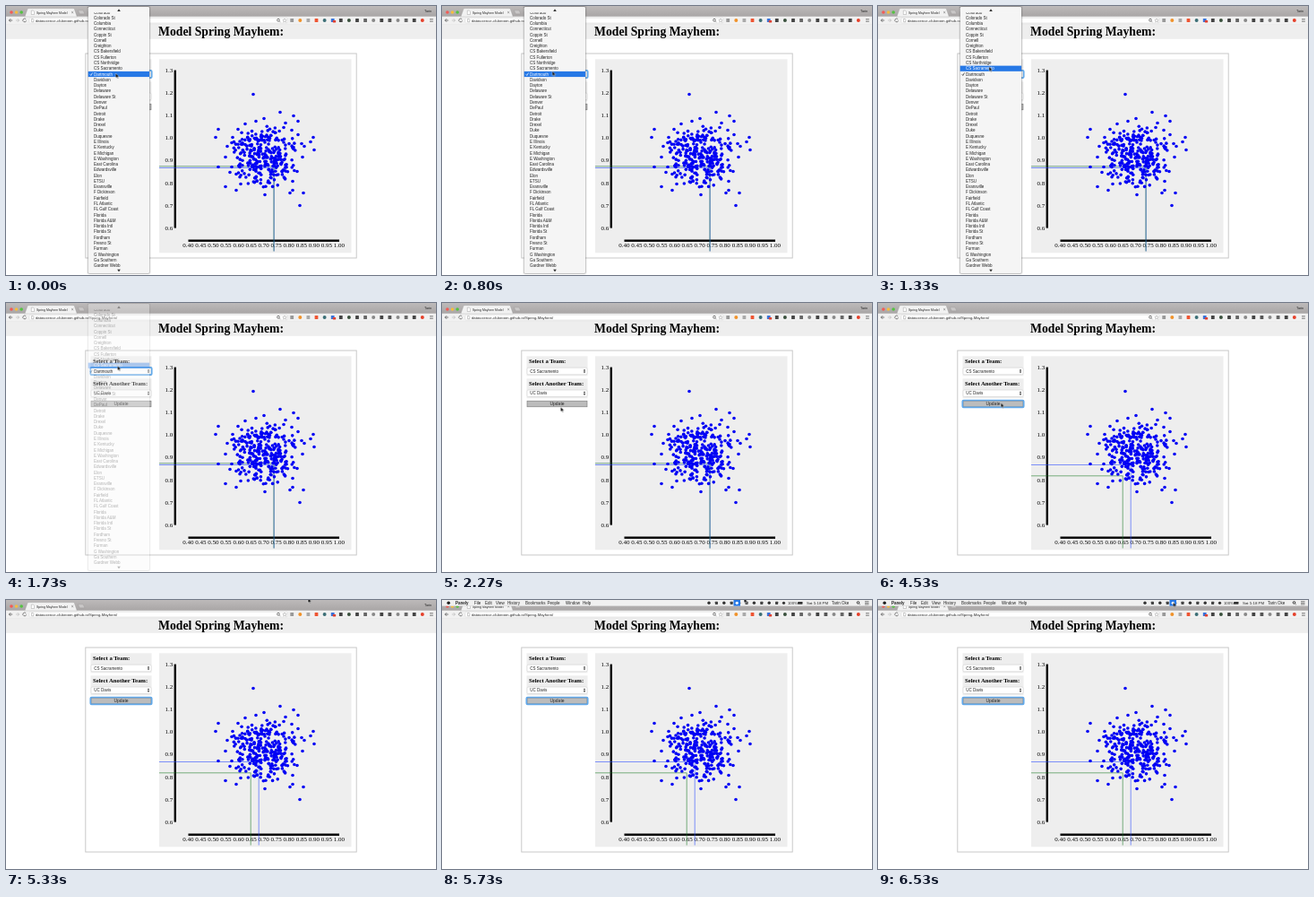
An HTML page that plays this animation: 480x300 px, repeating every 6.59 s.

```html
<!DOCTYPE html>
<html lang="en">
<head>
<meta charset="utf-8">
<title>Spring Mayhem Model</title>
<style>
  html, body { margin: 0; width: 100%; height: 100%; overflow: hidden; background: #fff; }
  svg { display: block; width: 100%; height: 100%; }
  text { font-family: "Liberation Sans", Arial, sans-serif; font-size: 4.5px; fill: #222; white-space: pre; }
  .serif { font-family: "Liberation Serif", Times, serif; fill: #000; }
  .bold { font-weight: bold; }
</style>
</head>
<body>
<svg id="stage" viewBox="0 0 480 300"></svg>
<script>
const LOOP = 6590;
const stage = document.getElementById('stage');

function add(parent, tag, attrs = {}, content) {
  const el = document.createElementNS('http://www.w3.org/2000/svg', tag);
  for (const key in attrs) el.setAttribute(key, attrs[key]);
  if (content !== undefined) el.textContent = content;
  parent.append(el);
  return el;
}
const group = (parent = stage) => add(parent, 'g');
const rect = (p, x, y, width, height, fill, more) => add(p, 'rect', { x, y, width, height, fill, ...more });
const circle = (p, cx, cy, r, fill) => add(p, 'circle', { cx, cy, r, fill });
const path = (p, d, fill, more) => add(p, 'path', { d, fill, ...more });
const text = (p, x, y, str, size = 4.5, more) => add(p, 'text', { x, y, style: `font-size:${size}px`, ...more }, str);
const line = (p, d, stroke, width = 0.7) => path(p, d, 'none', { stroke, 'stroke-width': width });

// steps: [ms, value]; equal neighbouring times make a hard change
function play(el, prop, steps) {
  const frames = steps.map(([ms, value]) => ({ offset: ms / LOOP, [prop]: value }));
  frames.unshift({ offset: 0, [prop]: steps[0][1] });
  frames.push({ offset: 1, [prop]: steps.at(-1)[1] });
  el.animate(frames, { duration: LOOP, iterations: Infinity });
}
const showUntil = (el, ms) => play(el, 'opacity', [[ms, 1], [ms, 0]]);
const showFrom = (el, ms) => play(el, 'opacity', [[ms, 0], [ms, 1]]);

function drawBrowser() {
  const g = group();
  const shade = add(g, 'linearGradient', { id: 'strip', x2: 0, y2: 1 });
  add(shade, 'stop', { offset: 0, 'stop-color': '#bdbaba' });
  add(shade, 'stop', { offset: 1, 'stop-color': '#a8a5a5' });
  rect(g, 0, 0, 480, 12, 'url(#strip)');
  rect(g, 0, 11.7, 480, 8.6, '#f1f1f1');
  path(g, 'M21 12 L24 3.5 Q24.3 2.7 25.2 2.7 H75 Q76 2.7 76.3 3.5 L79.3 12Z', '#f2f2f2', { stroke: '#999', 'stroke-width': 0.3 });
  ['#f25b56', '#f5bd3e', '#54c242'].forEach((c, i) => circle(g, 6 + i * 5.6, 7, 1.8, c));
  path(g, 'M28.3 5.1h2.2l1 1v3.4h-3.2z', '#fff', { stroke: '#888', 'stroke-width': 0.4 });
  text(g, 34, 8.5, 'Spring Mayhem Model', 3.45);
  line(g, 'M73.1 6l2.2 2.2m0-2.2l-2.2 2.2', '#666', 0.5);
  path(g, 'M80.5 4.8h5.6l1.7 4h-5.6z', '#c9c7c7', { stroke: '#8e8b8b', 'stroke-width': 0.3 });
  text(g, 467, 6.5, 'Tarin', 3.8);

  line(g, 'M7.2 16H3.5m1.7-1.8L3.4 16l1.8 1.8', '#444');
  line(g, 'M11 16h3.7m-1.8-1.8l1.8 1.8-1.8 1.8', '#bbb');
  line(g, 'M22.3 14.8a1.9 1.9 0 1 0 .3 1.6', '#555');
  rect(g, 26, 13.2, 288, 5.8, '#fff', { rx: 0.9, stroke: '#c8c8c8', 'stroke-width': 0.35 });
  path(g, 'M28.6 14.4h1.6l.7.7v2.7h-2.3z', '#fff', { stroke: '#777', 'stroke-width': 0.4 });
  text(g, 33, 17.5, 'datascience-clubroom.github.io/Spring-Mayhem/', 4.25);
  circle(g, 304, 15.7, 1.4, 'none').setAttribute('stroke', '#777');
  line(g, 'M305 16.8l1.4 1.4', '#777');
  path(g, 'M311 13.9l.7 1.5 1.6.1-1.2 1 .4 1.6-1.5-.9-1.4.9.4-1.6-1.2-1 1.6-.1z', '#fff', { stroke: '#888', 'stroke-width': 0.4 });

  const icons = ['#999', '#f0922b', '#aaa', '#ee5533', '#3c6f76', '#3a72d8', '#444', '#39503c', '#444',
    '#666', '#888', '#444', '#555', '#888', '#666', '#444', '#e5402a'];
  icons.forEach((c, i) => {
    const x = 319.2 + i * 9.1;
    i % 3 === 1 ? circle(g, x, 16, 2, c) : rect(g, x - 1.9, 14.1, 3.8, 3.8, c, { rx: 0.5 });
  });
  rect(g, 364.8, 15.9, 3.4, 2.5, '#df4030', { rx: 0.4 });
  for (const y of [14.5, 16, 17.5]) rect(g, 473, y - 0.3, 3.8, 0.6, '#666');
  rect(g, 0, 20, 480, 0.4, '#c8c8c8');
}

function drawSelect(g, y) {
  rect(g, 95, y, 67, 7.6, '#fff', { rx: 1.2, stroke: '#c6c6c6', 'stroke-width': 0.5 });
  path(g, `M157.8 ${y + 3.3}l1.2-1.8 1.2 1.8zM157.8 ${y + 4.3}l1.2 1.8 1.2-1.8z`, '#222');
}

const ring = (g, y, height) => rect(g, 94.3, y, 68.4, height, 'none', { rx: 1.2, stroke: '#62a9ea', 'stroke-width': 1.7 });

function drawPage() {
  const g = group();
  rect(g, 0, 20.4, 480, 16.4, '#eee');
  text(g, 240, 33.2, 'Model Spring Mayhem:', 13.7, { class: 'serif bold', 'text-anchor': 'middle' });
  rect(g, 88.8, 53, 302.4, 228, '#fff', { stroke: '#c8c8c8', 'stroke-width': 1 });
  rect(g, 94.5, 59.3, 68, 22, '#eee');
  rect(g, 94.5, 84.3, 68, 22, '#eee');
  text(g, 97, 67.2, 'Select a Team:', 6.7, { class: 'serif bold' });
  text(g, 97, 92.2, 'Select Another Team:', 6.7, { class: 'serif bold' });
  drawSelect(g, 72.2);
  drawSelect(g, 97);
  text(g, 98.3, 102.4, 'UC Davis');
  showUntil(text(g, 98.3, 77.6, 'Dartmouth'), 1800);
  showFrom(text(g, 98.3, 77.6, 'CS Sacramento'), 1800);
  showUntil(ring(g, 71.9, 8.2), 1800);

  rect(g, 95, 109.2, 67, 6.6, '#bcbcbc', { stroke: '#777', 'stroke-width': 0.6 });
  text(g, 128.5, 114.2, 'Update', 5, { 'text-anchor': 'middle' });
  showFrom(ring(g, 108.5, 7.9), 3530);
}

function drawPlot() {
  const g = group();
  rect(g, 171, 59.3, 214.5, 216, '#eee');
  rect(g, 187.6, 71.6, 2.4, 176, '#000');
  rect(g, 203.5, 260.5, 168.5, 2.4, '#000');
  for (let i = 0; i < 8; i++)
    text(g, 186.3, 74 + i * 25.1, (1.3 - i / 10).toFixed(1), 7, { class: 'serif', 'text-anchor': 'end' });
  for (let i = 0; i < 13; i++)
    text(g, 203.3 + i * 14.05, 269.4, (0.4 + i / 20).toFixed(2), 7, { class: 'serif', 'text-anchor': 'middle' });

  const marker = (p, x, y, color) => line(p, `M171 ${y}H${x}V273.5`, color, 0.6);
  const before = group(g), after = group(g);
  marker(before, 299.2, 180.5, '#3050ff');
  marker(before, 299, 178.8, '#16703a');
  marker(after, 282.2, 180.5, '#3050ff');
  marker(after, 273.2, 192.8, '#23802d');
  showUntil(before, 3530);
  showFrom(after, 3530);

  const edge = [[276, 99], [306, 119], [321, 123], [326, 129], [237, 138], [234, 147], [288, 126], [343, 147],
    [340, 152], [333, 157], [344, 161], [237, 180], [245, 202], [257, 206], [328, 223], [332, 209], [317, 209],
    [320, 206], [289, 211], [267, 132], [279, 129], [259, 138], [253, 147], [312, 131], [310, 136], [319, 139],
    [326, 144], [325, 185], [320, 196], [245, 169], [250, 186], [252, 180], [247, 157], [252, 153], [262, 199],
    [330, 154], [331, 169]];
  const dot = (x, y) => circle(g, x, y - 0.5, 1.8, '#0000f4');
  edge.forEach(([x, y]) => dot(x, y));

  let seed = 20;
  const random = () => (seed = seed * 16807 % 2147483647) / 2147483647;
  for (let n = 0; n < 280;) {
    const r = Math.sqrt(-2 * Math.log(random()));
    const a = random() * Math.PI * 2;
    if (r > 1.9) continue;
    dot(288.5 + 20.5 * r * Math.cos(a), 168 + 19 * r * Math.sin(a));
    n++;
  }
}

function drawPopup() {
  const teams = ('Colorado,Colorado St,Columbia,Connecticut,Coppin St,Cornell,Creighton,CS Bakersfield,CS Fullerton,' +
    'CS Northridge,CS Sacramento,Dartmouth,Davidson,Dayton,Delaware,Delaware St,Denver,DePaul,Detroit,Drake,Drexel,' +
    'Duke,Duquesne,E Illinois,E Kentucky,E Michigan,E Washington,East Carolina,Edwardsville,Elon,ETSU,Evansville,' +
    'F Dickinson,Fairfield,FL Atlantic,FL Gulf Coast,Florida,Florida A&M,Florida Intl,Florida St,Fordham,Fresno St,' +
    'Furman,G Washington,Ga Southern,Gardner Webb').split(',');
  const rowY = i => 76 + (i - 11) * 6.28;
  const g = group();
  for (const [grow, alpha] of [[1.6, 0.05], [0.9, 0.1], [0.4, 0.2]])
    rect(g, 91.7 - grow, 1 - grow, 68.4 + 2 * grow, 297 + 2 * grow, '#000', { rx: 2, opacity: alpha });
  rect(g, 91.7, 1, 68.4, 297, '#f5f5f5', { rx: 1.6 });
  const tick = (p, i, color) => line(p, `M93.8 ${rowY(i) + 0.2}l1 1.3 1.7-3`, color);
  teams.forEach((team, i) => text(g, 98, rowY(i) + 1.6, team));
  tick(g, 11, '#222');
  rect(g, 91.9, 1.2, 68, 6, '#f5f5f5', { rx: 1.4 });
  path(g, 'M124.2 6l1.8-2.8 1.8 2.8z', '#333');
  path(g, 'M124.2 293.8l1.8 2.8 1.8-2.8z', '#333');

  const highlight = i => {
    const row = group(g);
    rect(row, 91.7, rowY(i) - 3.1, 68.4, 6.2, '#2678e6');
    text(row, 98, rowY(i) + 1.6, teams[i]).style.fill = '#fff';
    if (i === 11) tick(row, i, '#fff');
    return row;
  };
  showUntil(highlight(11), 1000);
  showFrom(highlight(10), 1000);
  play(g, 'opacity', [[1600, 1], [1800, 0]]);
}

function drawMenuBar() {
  const g = group();
  rect(g, 0, 0, 480, 6.8, '#f0f0f0');
  rect(g, 0, 6.6, 480, 0.3, '#bbb');
  circle(g, 7.3, 3.3, 1.8, '#222');
  text(g, 15, 4.9, 'Panely', 4.5, { class: 'bold' });
  const menus = { File: 36, Edit: 48, View: 60, History: 73, Bookmarks: 93, People: 117.5, Window: 138, Help: 157 };
  for (const name in menus) text(g, menus[name], 4.9, name);
  for (let i = 0; i < 10; i++) {
    const x = 298 + i * 8.4;
    i % 2 ? rect(g, x - 1.6, 1.7, 3.2, 3.2, '#444', { rx: 0.6 }) : circle(g, x, 3.3, 1.7, '#333');
  }
  rect(g, 325.5, 0, 7.5, 6.6, '#2678e6');
  circle(g, 329.2, 3.3, 1.6, '#fff');
  rect(g, 378, 0.5, 25.5, 5.8, '#f0f0f0');
  circle(g, 381.5, 3.3, 1.6, '#333');
  text(g, 386, 4.9, '100%', 4.2);
  rect(g, 397, 2, 5.5, 2.7, '#333', { rx: 0.4 });
  text(g, 407, 4.9, 'Sat 5:18 PM', 4.4);
  text(g, 435, 4.9, 'Tarin Oke', 4.5);
  circle(g, 464.5, 2.9, 1.3, 'none').setAttribute('stroke', '#333');
  line(g, 'M465.4 3.8l1.4 1.4', '#333');
  line(g, 'M472 1.7h4.5m-4.5 1.6h4.5m-4.5 1.6h4.5', '#333', 0.6);
  play(g, 'transform', [[5450, 'translate(0px, -8px)'], [5650, 'translate(0px, 0px)']]);
}

function drawCursor() {
  const g = group();
  path(g, 'M0 0V5.2L1.2 4.1L2 6L2.9 5.6L2.1 3.8H3.7Z', '#000', { stroke: '#fff', 'stroke-width': 0.4 });
  const route = [[670, 122.5, 75], [950, 124, 70], [1330, 124, 67.5], [1730, 124.5, 70], [1900, 131, 73],
    [2000, 132.5, 74], [2070, 133, 95], [2130, 133, 115.5], [2270, 132.5, 116], [3270, 132.3, 115],
    [3480, 137, 111.5], [4530, 137, 111.5], [4700, 180, 82], [4900, 282, 24], [5070, 337.3, -2],
    [5800, 337.3, -2], [6100, 329.5, 2.5]];
  play(g, 'transform', route.map(([ms, x, y]) => [ms, `translate(${x}px, ${y}px)`]));
}

drawBrowser();
drawPage();
drawPlot();
drawPopup();
drawMenuBar();
drawCursor();
</script>
</body>
</html>
```
